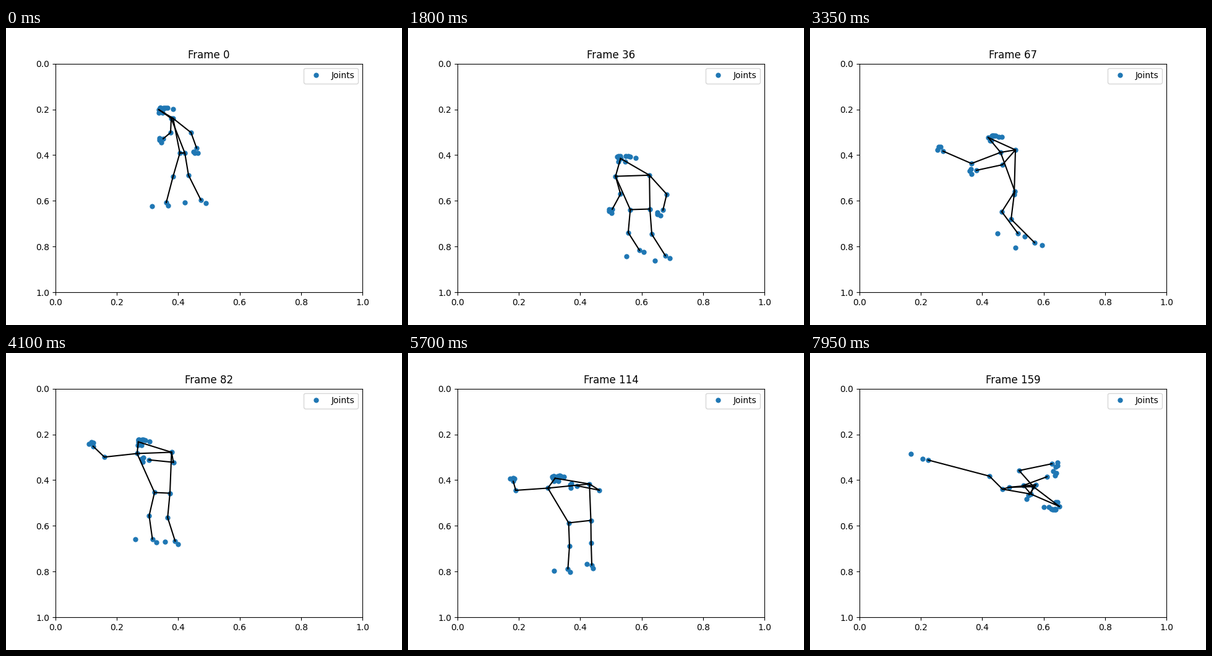
A matplotlib script for the animation above (8 s loop, 640x480 px).

```python
import numpy as np
import matplotlib.pyplot as plt
from matplotlib.animation import FuncAnimation

FRAMES, STEP_MS = 160, 50

# Joint order on each side; the nose is joint 0 and the left side follows it.
SHOULDER, ELBOW, WRIST, HIP, KNEE, ANKLE = range(6)
SIDE_SIZE = 16
LEFT, RIGHT = 1, 1 + SIDE_SIZE
LIMBS = [(SHOULDER, ELBOW), (ELBOW, WRIST), (SHOULDER, HIP),
         (HIP, KNEE), (KNEE, ANKLE)]
LINKS = [(0, LEFT), (0, RIGHT), (LEFT, RIGHT), (LEFT + HIP, RIGHT + HIP)]
LINKS += [(s + a, s + b) for s in (LEFT, RIGHT) for a, b in LIMBS]


def fingers(wrist, reach):
    """Pinky, index and thumb fan out around the reach of the hand."""
    reach = np.array(reach, float)
    across = np.array([reach[1], -reach[0]]) / np.hypot(*reach)
    return wrist + [0.8 * reach + 5 * across, reach, 0.8 * reach - 2.5 * across]


def foot(knee, ankle, toe):
    """The heel continues the shin and lies opposite the toes."""
    toe = np.array(toe)
    return ankle + [0.15 * (ankle - knee) - 0.2 * toe, toe]


def half_face(nose, depth, width, up):
    """Inner, middle and outer eye, ear and mouth corner of one side."""
    back = depth * np.array([0.35, 0.42, 0.5, 1, 0.2])
    aside = width * np.array([0.33, 0.54, 0.75, 1, 0.4])
    height = up * np.array([-3.5, -3.5, -3, -1, 5])
    return nose + np.column_stack([back + aside, height])


def pose(nose, head, left, right):
    """head: depth, half width, up; side: six joints, then hand and toe."""
    depth, width, up = head
    parts = [[nose]]
    for (*joints, hand, toe), sign in ((left, 1), (right, -1)):
        joints = np.array(joints, float)
        parts += [joints, fingers(joints[WRIST], hand),
                  foot(joints[KNEE], joints[ANKLE], toe),
                  half_face(nose, depth, sign * width, up)]
    return np.vstack(parts)


def moved(base, dx, dy, turn=0):
    """Turn a pose about its hips and shift it."""
    hips = (base[LEFT + HIP] + base[RIGHT + HIP]) / 2
    c, s = np.cos(np.radians(turn)), np.sin(np.radians(turn))
    return (base - hips) @ np.array([[c, -s], [s, c]]) + hips + (dx, dy)


walk = pose(
    (247, 132), (15, 8, 1),
    [(270, 146), (299, 169), (308, 194), (281, 202), (270, 240), (259, 282),
     (-3, 8), (-23, 6)],
    [(267, 146), (266, 169), (254, 179), (289, 202), (295, 238), (315, 278),
     (-6, 2), (-26, 4)])

front = pose(
    (338, 163), (7.5, 16.5, 1),
    [(388, 190), (417, 221), (427, 250), (385, 244), (391, 283), (415, 314),
     (-6, 8), (-11, 8)],
    [(324, 192), (330, 220), (320, 246), (347, 245), (342, 280), (361, 305),
     (-4, 3), (-19, 9)])

lean = pose(
    (336, 128), (22.5, 5.5, 1),
    [(370, 155), (394, 185), (327, 198), (385, 212), (377, 260), (391, 308),
     (-22, 2), (-39, 9)],
    [(350, 156), (366, 187), (340, 206), (377, 213), (380, 258), (395, 300),
     (-10, 3), (-31, 12)])

lunge = pose(
    (288, 177), (19.5, 2.5, 1),
    [(332, 197), (311, 221), (269, 230), (330, 269), (325, 309), (363, 347),
     (-11, 1), (-31, 8)],
    [(308, 201), (261, 219), (215, 199), (331, 264), (310, 297), (336, 332),
     (-7, -7), (-33, 0)])

wide = pose(
    (183, 116), (6, 10, 1),
    [(242, 131), (258, 143), (220, 132), (239, 194), (236, 233), (234, 271),
     (-12, -3), (-9, -2)],
    [(169, 132), (113, 131), (110, 115), (200, 195), (198, 235), (192, 274),
     (0, -6), (-24, 1)])

upside = pose(
    (211, 236), (16.5, 1, -1),
    [(270, 214), (268, 185), (231, 167), (253, 146), (229, 106), (238, 66),
     (-10, -5), (9, -8)],
    [(216, 216), (204, 196), (206, 184), (230, 147), (215, 100), (233, 61),
     (2, -1), (-19, -3)])

roll = pose(
    (403, 248), (-21, -4, -1.4),
    [(361, 216), (338, 190), (391, 179), (322, 217), (365, 213), (354, 229),
     (9, 3), (-4, 7)],
    [(357, 228), (345, 214), (383, 200), (311, 220), (290, 199), (191, 173),
     (15, -6), (-28, -10)])

KEYS = {
    0: walk,
    7: moved(walk, -60, 25),
    14: moved((walk + front) / 2, 0, 40),
    20: front,
    27: moved(front, 10, 25),
    43: moved((front + lean) / 2, 0, 55),
    52: lean,
    60: moved((lean + lunge) / 2, 0, 30),
    67: lunge,
    78: moved((lunge + wide) / 2, -5, 8),
    96: wide,
    113: moved(wide, 60, 80),
    123: moved(wide, 20, 30, turn=90),
    133: upside,
    144: moved(upside, -15, 130, turn=45),
    152: moved(roll, -20, 60),
    159: roll,
}
times = np.array(list(KEYS), float)
poses = (np.stack(list(KEYS.values())) - (80, 57.6)) / (496, 369.6)
slopes = np.gradient(poses, times, axis=0)


def joints_at(t):
    """Smooth cubic path through the key poses."""
    i = int(np.clip(np.searchsorted(times, t, "right") - 1, 0, len(times) - 2))
    span = times[i + 1] - times[i]
    u = (t - times[i]) / span
    blend = u * u * (3 - 2 * u)
    return (poses[i] * (1 - blend) + poses[i + 1] * blend
            + span * u * (1 - u) * ((1 - u) * slopes[i] - u * slopes[i + 1]))


fig, ax = plt.subplots(figsize=(6.4, 4.8), dpi=100)
ax.set_xlim(0, 1)
ax.set_ylim(1, 0)
dots, = ax.plot([], [], "o", markersize=5, label="Joints")
bones = [ax.plot([], [], "k-")[0] for _ in LINKS]
ax.legend(loc="upper right")
title = ax.set_title("Frame 0")


def update(n):
    pts = joints_at(n)
    dots.set_data(pts[:, 0], pts[:, 1])
    for bone, (a, b) in zip(bones, LINKS):
        bone.set_data(pts[[a, b], 0], pts[[a, b], 1])
    title.set_text(f"Frame {n}")
    return [dots, title, *bones]


anim = FuncAnimation(fig, update, frames=FRAMES, interval=STEP_MS,
                     repeat=True, repeat_delay=0)
plt.show()
```
